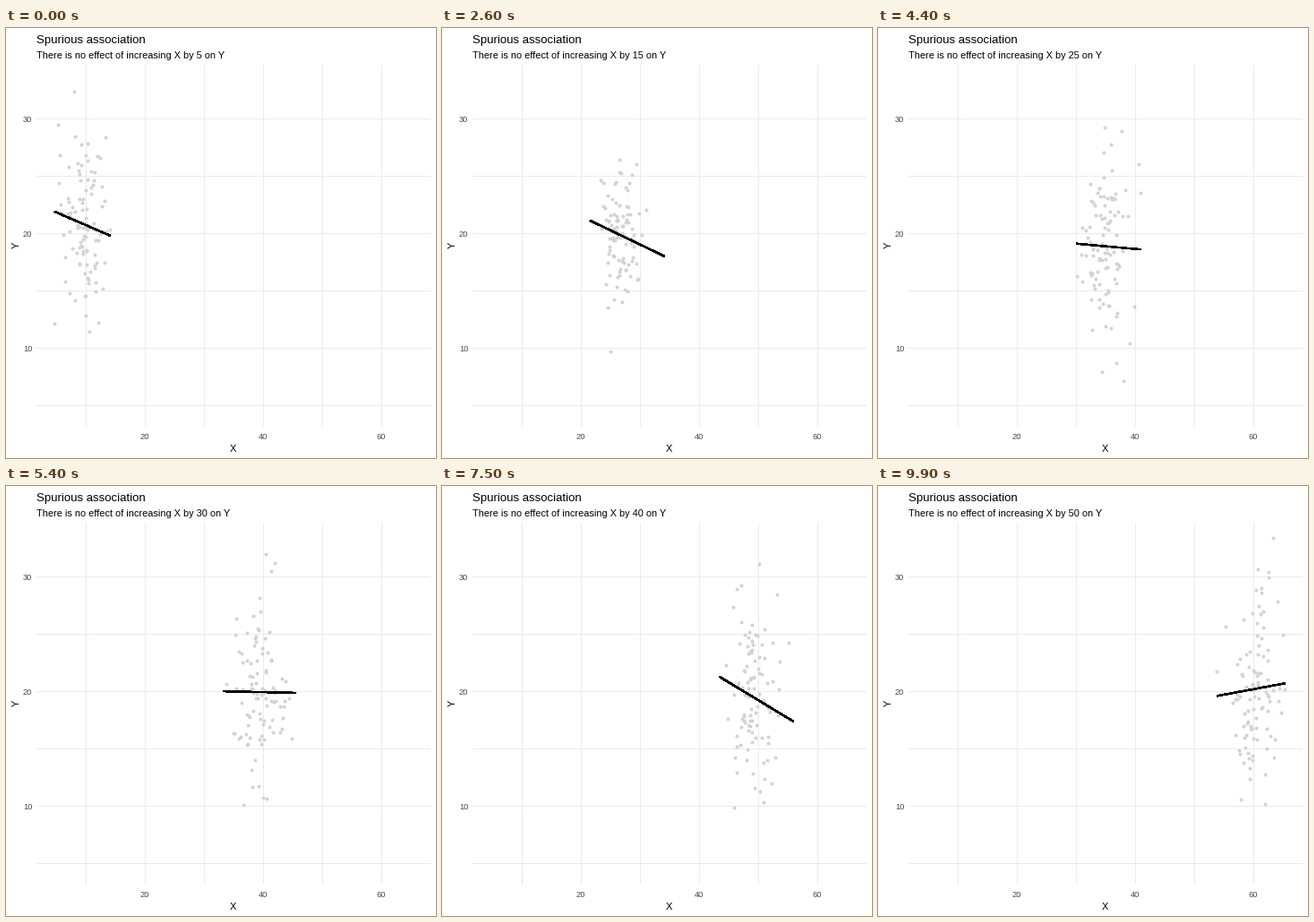
These frames come from a looping animation (480x480 px, 10000 ms). A matplotlib script:

```python
import numpy as np
import matplotlib.pyplot as plt
from matplotlib.animation import FuncAnimation

SIZE, FRAMES, STEP, N = 480, 100, 11, 100
LEFT, TOP, RIGHT, BOTTOM = 34, 41, 474, 445
X_ORIGIN, X_UNIT = 23.25, 6.6
Y_ORIGIN, Y_UNIT = 485.25, 12.8

plt.rcParams["font.family"] = "Liberation Sans"

# Fitted line of each state: x start, y start, x end, y end
LINES = np.array([
    (4.7, 21.9, 14.1, 19.8), (12.8, 18.8, 25.4, 20.5),
    (19.7, 21.3, 31.8, 18.0), (24.7, 20.8, 38.2, 18.0),
    (30.1, 19.1, 40.9, 18.6), (33.5, 20.1, 45.9, 20.0),
    (37.5, 19.4, 49.6, 20.9), (44.7, 21.7, 57.3, 16.6),
    (48.5, 20.2, 62.2, 19.8), (53.8, 19.6, 65.3, 20.7),
])
MEANS = np.r_[10, 20:61:5]


def make_states():
    """Noisy points around each line, spanning exactly its x range."""
    rng = np.random.default_rng(7)
    states = []
    for mean, (x0, y0, x1, y1) in zip(MEANS, LINES):
        x = np.clip(rng.normal(mean, 2.3, N), x0 + 0.3, x1 - 0.3)
        x[x.argmin()], x[x.argmax()] = x0, x1
        noise = rng.normal(0, 4.8, N)
        y = np.interp(x, [x0, x1], [y0, y1]) + noise - noise.mean()
        states.append(np.column_stack([x, y]))
    return np.array(states)


def blend(states, step):
    k = min(step // STEP, len(states) - 2)
    u = step / STEP - k
    return states[k] * (1 - u) + states[k + 1] * u


STATES = make_states()

fig = plt.figure(figsize=(SIZE / 72, SIZE / 72), dpi=72, facecolor="white")
ax = fig.add_axes([LEFT / SIZE, 1 - BOTTOM / SIZE,
                   (RIGHT - LEFT) / SIZE, (BOTTOM - TOP) / SIZE])
ax.set_xlim((LEFT - X_ORIGIN) / X_UNIT, (RIGHT - X_ORIGIN) / X_UNIT)
ax.set_ylim((Y_ORIGIN - BOTTOM) / Y_UNIT, (Y_ORIGIN - TOP) / Y_UNIT)
ax.axis("off")

grid = dict(color="#ebebeb", lw=1, antialiased=False, zorder=0)
for x in range(10, 61, 10):
    ax.axvline(x, **grid)
for y in range(5, 31, 5):
    ax.axhline(y, **grid)


def label(x, y, text, size, color="black", ha="left", **kw):
    """Place text by its baseline, in pixels from the top left corner."""
    kw.setdefault("va", "baseline")
    return fig.text(x / SIZE, 1 - y / SIZE, text, fontsize=size,
                    color=color, ha=ha, **kw)


label(34, 17, "Spurious association", 13.2)
subtitle = label(34, 34, "", 11)
for x in (20, 40, 60):
    label(X_ORIGIN + X_UNIT * x, 459, str(x), 9.4, "#4d4d4d", "center")
for y in (10, 20, 30):
    label(29.5, Y_ORIGIN + 4 - Y_UNIT * y, str(y), 9.4, "#4d4d4d", "right")
label(253.5, 473, "X", 11, ha="center")
label(11.5, 242.5, "Y", 11, ha="center", va="center", rotation=90)

dots = ax.scatter([], [], s=16, color="#d3d3d3", linewidths=0,
                  antialiased=False, zorder=2)
fit, = ax.plot([], [], color="black", lw=1.6, antialiased=False,
               solid_capstyle="butt", zorder=3)


def draw(step):
    dots.set_offsets(blend(STATES, step))
    x0, y0, x1, y1 = blend(LINES, step)
    fit.set_data([x0, x1], [y0, y1])
    amount = 5 * (1 + round(step / STEP))
    subtitle.set_text(f"There is no effect of increasing X by {amount} on Y")
    return dots, fit, subtitle


anim = FuncAnimation(fig, draw, frames=FRAMES, interval=100,
                     repeat=True, repeat_delay=0)
plt.show()
```
